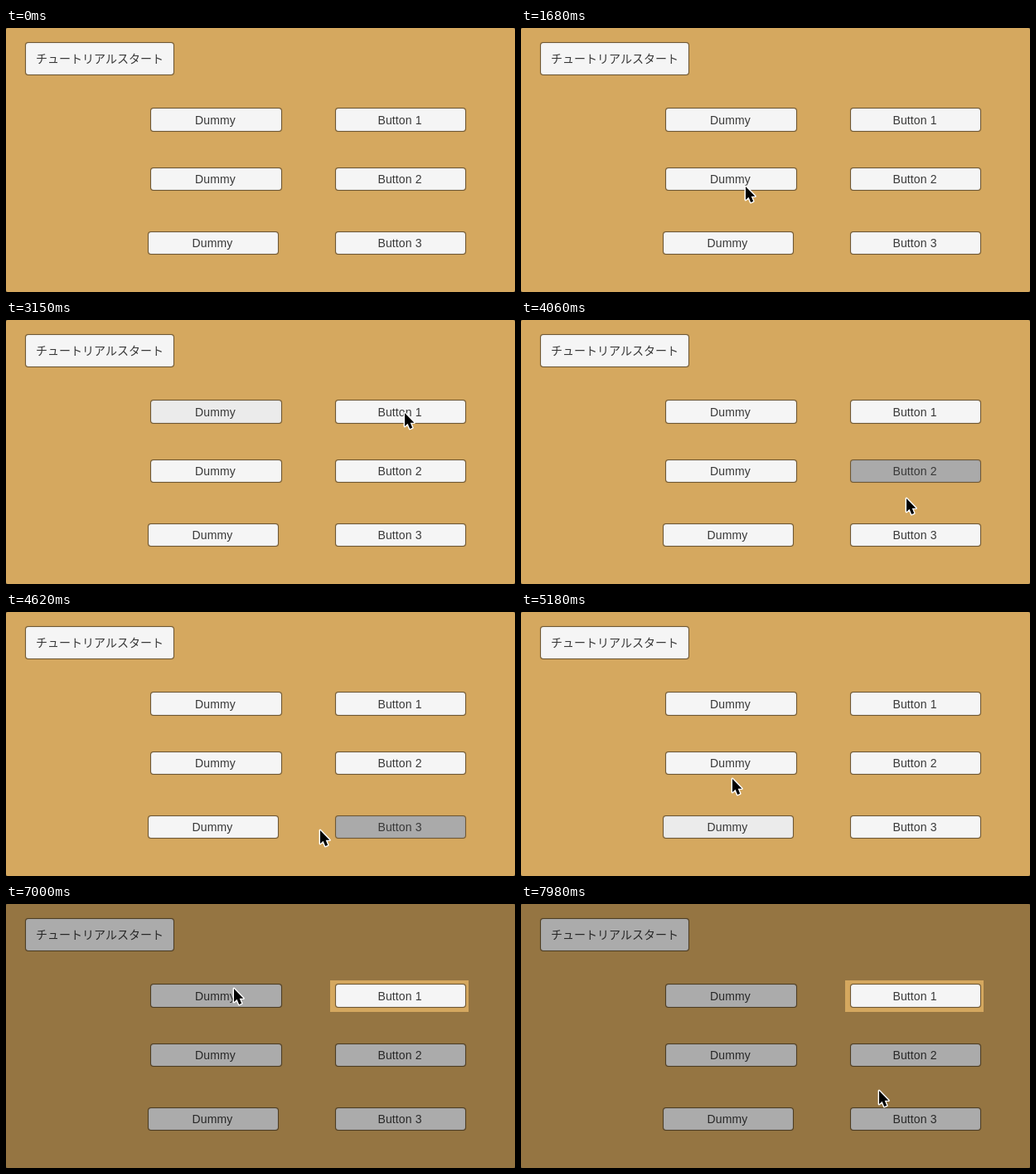
An HTML page that plays this animation: 614x318 px, repeating every 8 s.

```html
<!DOCTYPE html>
<html lang="ja">
<head>
<meta charset="utf-8">
<style>
html, body { margin: 0; width: 100%; height: 100%; overflow: hidden; background: #4a4438; }
#stage { position: relative; width: 614px; height: 318px; overflow: hidden; border-radius: 2px; background: #d5a85f; }
.btn {
  position: absolute; box-sizing: border-box; padding-right: 2px;
  display: flex; align-items: center; justify-content: center;
  border: 1px solid rgba(60, 50, 35, .55); border-radius: 4px; background-clip: padding-box;
  box-shadow: 0 0 1px rgba(60, 45, 20, .3), inset 0 0 1px 1px rgba(0, 0, 0, .04);
  color: #383838; font: 14px "Liberation Sans", Arial, sans-serif; letter-spacing: .12px; white-space: nowrap;
}
#start { padding: 0 0 2px; letter-spacing: 0; font-family: "Noto Sans CJK JP", "Noto Sans CJK", sans-serif; }
#mask { position: absolute; left: 391px; top: 92px; width: 167px; height: 38px; box-shadow: 0 0 0 700px rgba(0, 0, 0, .3); }
#cursor { position: absolute; left: 0; top: 0; overflow: visible; }
</style>
</head>
<body>
<div id="stage">
  <div id="mask"></div>
  <svg id="cursor" width="20" height="28">
    <path d="M1 2V18L4.6 14.8 7.2 21 10.2 19.7 7.7 13.7H12.4Z" stroke="#fff" stroke-width="2.8" stroke-linejoin="round" paint-order="stroke"/>
  </svg>
</div>
<script>
const LOOP = 8000, TICK = 70, FADE = 100, PRESS = 140, REST = 140, MASK_ON = 5880;
const IDLE = 245, PRESSED = 192, SELECTED = 235, TARGET_SELECTED = 170;
const stage = document.getElementById('stage');
const mask = document.getElementById('mask');
const cursor = document.getElementById('cursor');

// time and place of each pointer stop, with the button clicked there
const stops = [
  [420, 640, 290], [1050, 178, 120], [1260, 222, 84],
  [1680, 270, 189, 'dummy2'], [2500, 322, 111, 'dummy1'],
  [3200, 484, 110, 'button1'], [3620, 480, 182, 'button2'], [3990, 463, 207],
  [4320, 475, 260, 'button3'], [4800, 262, 262, 'dummy3'], [5180, 254, 199],
  [5600, 174, 42, 'start'], [6650, 174, 42, 'none'],
  [7280, 428, 190], [7420, 398, 163], [7700, 428, 188], [7980, 431, 223]
];
const clicks = stops.filter(s => s[3]);

const buttons = [];
function addButton(id, label, x, y, w, h) {
  const el = document.createElement('div');
  el.className = 'btn';
  el.id = id;
  el.textContent = label;
  el.style.cssText = `left:${x}px;top:${y}px;width:${w}px;height:${h}px`;
  stage.insertBefore(el, mask);
  const i = clicks.findIndex(c => c[3] === id);
  const isTarget = id.startsWith('button');
  buttons.push({
    el,
    down: clicks[i][0],
    left: clicks[i + 1][0] + PRESS,
    pressed: isTarget ? TARGET_SELECTED : PRESSED,
    selected: isTarget ? TARGET_SELECTED : SELECTED
  });
}
addButton('start', 'チュートリアルスタート', 23, 17, 180, 40);
[96, 168, 245].forEach((y, i) => {
  const n = i + 1, h = i ? 28 : 29;
  addButton('dummy' + n, 'Dummy', i < 2 ? 174 : 171, y, i < 2 ? 159 : 158, h);
  addButton('button' + n, 'Button ' + n, 397, y, 158, h);
});

const clamp = k => Math.min(1, Math.max(0, k));
const mix = (a, b, k) => a + (b - a) * k;
const ease = k => k * k * (3 - 2 * k);

function level(b, t) {
  const fade = (from, to, start) => mix(from, to, clamp((t - start) / FADE));
  const held = fade(IDLE, b.pressed, b.down);
  return fade(fade(held, b.selected, b.down + PRESS), IDLE, b.left);
}

// rest briefly after a click, then glide to the next stop
function tip(t) {
  const i = Math.max(1, stops.findIndex(s => s[0] >= t));
  const [t0, x0, y0, clicked] = stops[i - 1], [t1, x1, y1] = stops[i];
  const start = t0 + (clicked ? REST : 0);
  const k = ease(clamp((t - start) / (t1 - start)));
  return [mix(x0, x1, k), mix(y0, y1, k)];
}

function draw(now) {
  const t = Math.floor(now % LOOP / TICK) * TICK;
  for (const b of buttons) {
    const g = level(b, t);
    b.el.style.backgroundColor = `rgb(${g},${g},${g})`;
  }
  const [x, y] = tip(t);
  cursor.style.transform = `translate(${Math.round(x)}px,${Math.round(y)}px)`;
  mask.style.display = t >= MASK_ON ? 'block' : 'none';
}

const begin = performance.now();
function loop() {
  draw(performance.now() - begin);
  requestAnimationFrame(loop);
}
loop();
</script>
</body>
</html>
```
